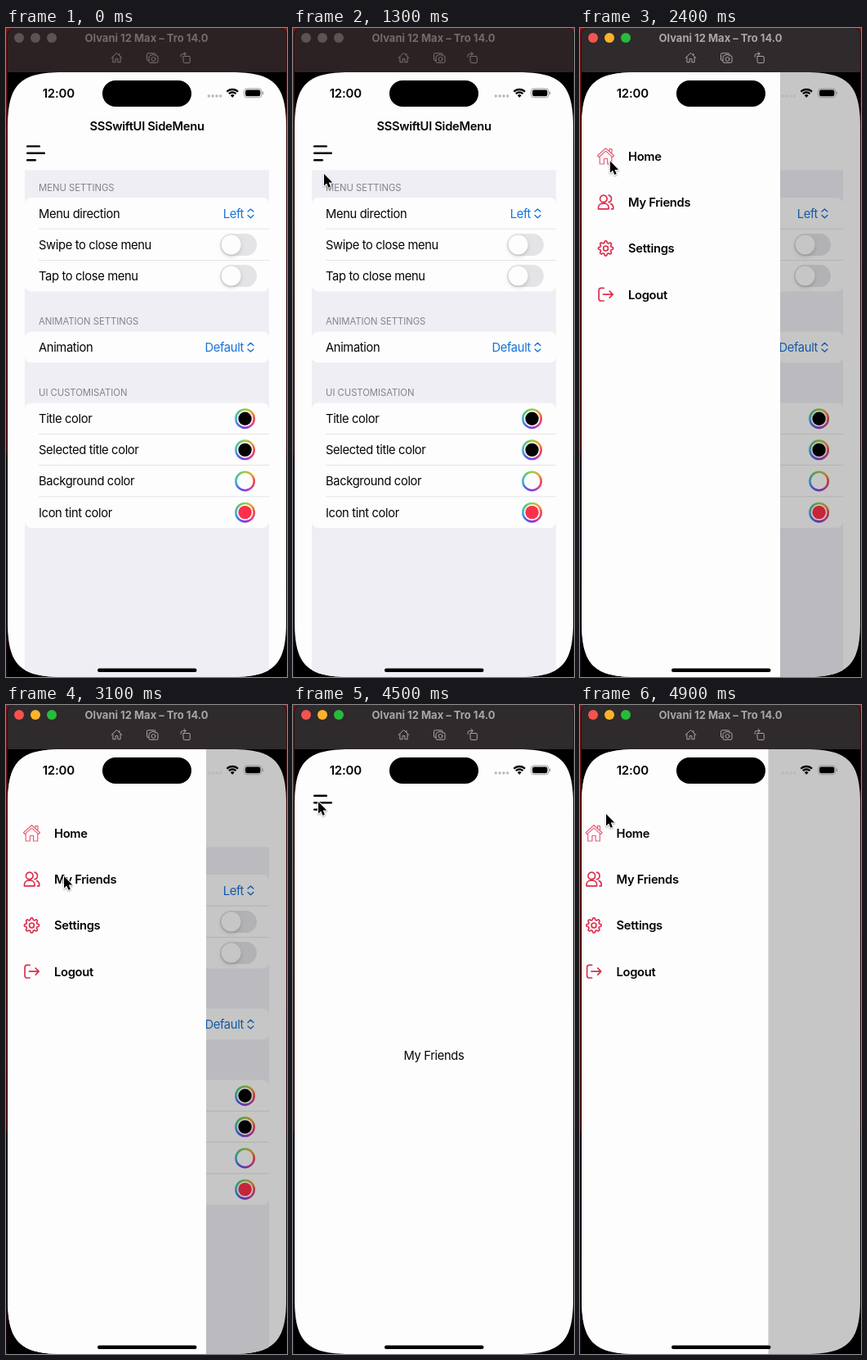
Recreate the animation shown at these times as an HTML page with a canvas. Size 344x792 px, loop 5 s.

```html
<!DOCTYPE html>
<html lang="en">
<head>
<meta charset="utf-8">
<title>Side menu</title>
<style>
html, body { margin: 0; width: 100%; height: 100%; overflow: hidden; background: #000; }
canvas { display: block; width: 344px; height: 792px; }
</style>
</head>
<body>
<canvas id="stage"></canvas>
<script>
const W = 344, H = 792, LOOP = 5000, STEP = 100;
const LEFT = 2, RIGHT = 343, TOP = 54, MENU = 243, SLIDE = 350;
const OPEN_1 = 1855, CLOSE = 3381, OPEN_2 = 4602, ACTIVE = 1800;
const FONT = 'Inter, "Noto Sans", sans-serif';
const WHITE = '#fdfdfd', INK = '#050505', BLUE = '#1873d8', TINT = '#dd2e4f';

const canvas = document.getElementById('stage');
const ctx = canvas.getContext('2d');
const dpr = window.devicePixelRatio || 1;
canvas.width = W * dpr;
canvas.height = H * dpr;

// time, x, y of the pointer tip
const POINTER = [
  [1100, 62, 240], [1300, 38, 178], [1600, 30, 153], [2300, 30, 153],
  [2900, 71, 209], [3300, 71, 209], [3600, 80, 275], [3800, 80, 275],
  [4400, 31, 118], [4600, 31, 118], [4900, 32, 133]
];

const icons = {
  home: new Path2D('M-10-.5L0-9.6 10-.5 8.4 1.3 0-6.2-8.4 1.3ZM4.5-8.6h3v4.6M4.5-8.6v2.6M-7.3 1v8.7h5.2V3.2h4.2v6.5h5.2V1'),
  friends: new Path2D('M1.6-4.2a4.3 4.3 0 1 1-8.6 0a4.3 4.3 0 1 1 8.6 0ZM-9 8.2V6.2a5 5 0 0 1 5-4.6h2.6a5 5 0 0 1 5 4.6v2ZM3.6-8.4a4.3 4.3 0 0 1 0 8.4M6.2 1.9a5 5 0 0 1 3 4.3v2H7'),
  settings: gear(),
  logout: new Path2D('M-2.4-7.8H-6a2.4 2.4 0 0 0-2.4 2.4V5.4A2.4 2.4 0 0 0-6 7.8h3.6M-3 0H8.6M4.7-4L8.7 0 4.7 4'),
  toolHome: new Path2D('M-6.5.3L0-5.8 6.5.3M-4.6-.8V5.5h3.2V1.4h2.8v4.1h3.2V-.8M3.4-5v2'),
  toolShot: new Path2D('M-4.2 3.2H-5a1.5 1.5 0 0 1-1.5-1.5V-4A1.5 1.5 0 0 1-5-5.5H2.5A1.5 1.5 0 0 1 4-4v.5M-4-1.2A1.2 1.2 0 0 1-2.8-2.4h1l1-1.3h3.6l1 1.3h2A1.2 1.2 0 0 1 7-1.2v6a1.2 1.2 0 0 1-1.2 1.2h-8.6A1.2 1.2 0 0 1-4 4.8ZM3.9 1.7a2.4 2.4 0 1 1-4.8 0a2.4 2.4 0 1 1 4.8 0Z'),
  toolTurn: new Path2D('M-2.8-1.8H4A1.3 1.3 0 0 1 5.3-.5V5A1.3 1.3 0 0 1 4 6.3h-5.5A1.3 1.3 0 0 1-2.8 5ZM-6-1v-1.2A2.6 2.6 0 0 1-3.4-4.8H0M-2-7L.2-4.8-2-2.8')
};
const arrow = new Path2D('M0 0V14.4L3.2 11.4 5.5 16.7 7.9 15.7 5.7 10.6H10.3Z');

function gear() {
  const p = new Path2D();
  for (let i = 0; i < 120; i++) {
    const a = i / 120 * 2 * Math.PI;
    const r = 7.9 + 1.2 * Math.tanh(1.8 * Math.cos(8 * a));
    p.lineTo(r * Math.cos(a), r * Math.sin(a));
  }
  p.closePath();
  p.moveTo(2.9, 0);
  p.arc(0, 0, 2.9, 0, 7);
  return p;
}

function rect(x, y, w, h, color, r = 0) {
  ctx.fillStyle = color;
  ctx.beginPath();
  ctx.roundRect(x, y, w, h, r);
  ctx.fill();
}

function disc(x, y, r, color) {
  ctx.fillStyle = color;
  ctx.beginPath();
  ctx.arc(x, y, r, 0, 2 * Math.PI);
  ctx.fill();
}

function text(str, x, y, { size = 14.75, weight = 400, color = INK, align = 'left', gap = -0.37 } = {}) {
  ctx.font = `${weight} ${size}px ${FONT}`;
  ctx.letterSpacing = gap + 'px';
  ctx.textAlign = align;
  ctx.textBaseline = 'alphabetic';
  ctx.fillStyle = color;
  ctx.fillText(str, x, y + size * 0.364);
}

function icon(path, x, y, color, width) {
  ctx.save();
  ctx.translate(x, y);
  ctx.strokeStyle = color;
  ctx.lineWidth = width;
  ctx.lineCap = ctx.lineJoin = 'round';
  ctx.stroke(path);
  ctx.restore();
}

function phoneShape() {
  const e = 67, c = 15, l = LEFT, r = RIGHT, t = TOP, b = H;
  ctx.beginPath();
  ctx.moveTo(l + e, t);
  ctx.lineTo(r - e, t);
  ctx.bezierCurveTo(r - c, t, r, t + c, r, t + e);
  ctx.lineTo(r, b - e);
  ctx.bezierCurveTo(r, b - c, r - c, b, r - e, b);
  ctx.lineTo(l + e, b);
  ctx.bezierCurveTo(l + c, b, l, b - c, l, b - e);
  ctx.lineTo(l, t + e);
  ctx.bezierCurveTo(l, t + c, l + c, t, l + e, t);
  ctx.closePath();
}

function drawWindow(active) {
  const edge = ctx.createLinearGradient(0, 0, 0, H);
  edge.addColorStop(0, '#741416');
  edge.addColorStop(0.655, '#4c0b14');
  edge.addColorStop(0.66, '#1d0b1a');
  edge.addColorStop(1, '#170a16');
  rect(0, 0, W, H, edge);
  rect(1.5, 0, 342, H, '#000', [8, 8, 0, 0]);
  rect(2, 0, 341, TOP, active ? '#2f2a2c' : '#2d2223', [8, 8, 0, 0]);

  const lights = active ? ['#f4544d', '#fcb32b', '#27bb3c'] : Array(3).fill('#5d5354');
  lights.forEach((color, i) => disc(16 + 20 * i, 12, 6, color));
  text('Olvani 12 Max – Tro 14.0', 172, 11.8,
    { size: 13, weight: 700, color: active ? '#aaa6a7' : '#736a6b', align: 'center', gap: 0 });
  const tone = active ? '#a9a5a6' : '#7b7273';
  icon(icons.toolHome, 135.5, 36.3, tone, 1);
  icon(icons.toolShot, 179, 36.3, tone, 1);
  icon(icons.toolTurn, 220, 36.3, tone, 1);
}

function burger(y) {
  [17, 23, 12].forEach((w, i) => rect(25, y + 8.4 * i - 1.2, w, 2.4, INK, 1.2));
}

function toggle(y) {
  rect(262, y - 13.5, 45, 27, '#e4e4e6', 13.5);
  ctx.save();
  ctx.shadowColor = 'rgba(0,0,0,.18)';
  ctx.shadowBlur = 4;
  ctx.shadowOffsetY = 2;
  disc(275.6, y, 12, WHITE);
  ctx.restore();
}

function picker(label, y) {
  text(label, 291, y, { color: BLUE, align: 'right' });
  icon(new Path2D('M-3.4-2.2L0-5.4 3.4-2.2M-3.4 2.2L0 5.4 3.4 2.2'), 299.5, y, BLUE, 1.4);
}

function colorWell(y, color) {
  const x = 292.6;
  const ring = ctx.createConicGradient(0, x, y);
  ['#ee4a4a', '#d6409c', '#8a3ad8', '#4d6ae8', '#46b4dc', '#55c878', '#98d048', '#eea23c', '#ee4a4a']
    .forEach((c, i) => ring.addColorStop(i / 8, c));
  ctx.strokeStyle = ring;
  ctx.lineWidth = 2.6;
  ctx.beginPath();
  ctx.arc(x, y, 11.2, 0, 2 * Math.PI);
  ctx.stroke();
  disc(x, y, 8.2, color);
}

function section(title, y, rows) {
  text(title, 40, y - 12.3, { size: 11.3, color: '#838389', gap: -0.03 });
  rect(23, y, 299, rows.length * 38.15, WHITE, 8);
  rows.forEach(([label, control, value], i) => {
    const mid = y + 19.3 + 38.15 * i;
    text(label, 40, mid, {});
    if (i) rect(40, y + 38.15 * i - 0.4, 282, 0.8, '#dcdce0');
    if (control === picker) picker(value, mid);
    else control(mid, value);
  });
}

function settingsPage() {
  text('SSSwiftUI SideMenu', 172.5, 119.5, { weight: 600, align: 'center', gap: -0.31 });
  burger(144.4);
  rect(23, 173.5, 299, H - 173.5, '#efeef4');
  section('MENU SETTINGS', 207, [
    ['Menu direction', picker, 'Left'],
    ['Swipe to close menu', toggle],
    ['Tap to close menu', toggle]
  ]);
  section('ANIMATION SETTINGS', 370.4, [['Animation', picker, 'Default']]);
  section('UI CUSTOMISATION', 457.4, [
    ['Title color', colorWell, '#000'],
    ['Selected title color', colorWell, '#000'],
    ['Background color', colorWell, WHITE],
    ['Icon tint color', colorWell, '#fc3049']
  ]);
}

function friendsPage() {
  burger(110.8);
  text('My Friends', 172.5, 427.5, { align: 'center' });
}

function drawMenu(shown) {
  const x = LEFT + MENU * (shown - 1);
  rect(x, TOP, MENU, H - TOP, WHITE);
  ['Home', 'My Friends', 'Settings', 'Logout'].forEach((label, i) => {
    const y = 156.3 + 56.3 * i;
    const key = label.split(' ').pop().toLowerCase();
    const first = i === 0;
    icon(icons[key], x + 29.5, y, first ? '#e9607a' : TINT, first ? 1.2 : 1.7);
    text(label, x + 57, y, { weight: 600, gap: -0.31 });
  });
}

function statusBar() {
  text('12:00', 64.3, 79.5, { size: 15, weight: 600, align: 'center', gap: -0.2 });
  rect(118, 64, 109, 32, '#000', 16);
  for (let i = 0; i < 4; i++) disc(248.3 + 4.8 * i, 83, 1.7, '#b9b9bb');

  ctx.strokeStyle = '#000';
  ctx.lineCap = 'butt';
  ctx.lineWidth = 2.3;
  for (const r of [9.6, 6.1]) {
    ctx.beginPath();
    ctx.arc(277.2, 84.6, r, -Math.PI * 0.75, -Math.PI * 0.25);
    ctx.stroke();
  }
  ctx.fillStyle = '#000';
  ctx.beginPath();
  ctx.moveTo(277.2, 85);
  ctx.arc(277.2, 84.6, 3.4, -Math.PI * 0.75, -Math.PI * 0.25);
  ctx.fill();

  ctx.strokeStyle = '#8f8f91';
  ctx.lineWidth = 0.9;
  ctx.beginPath();
  ctx.roundRect(291.5, 74, 21.4, 10.8, 3.4);
  ctx.stroke();
  rect(293, 75.5, 18.4, 7.8, '#000', 2.2);
  rect(313.8, 77.6, 1.3, 3.6, '#8f8f91', [0, 1, 1, 0]);
  rect(112, 781.6, 121.5, 4.4, '#000', 2.2);
}

function drawPointer(t) {
  if (t < POINTER[0][0]) return;
  let [, x, y] = POINTER[POINTER.length - 1];
  const i = POINTER.findIndex(p => p[0] > t);
  if (i > 0) {
    const [t0, x0, y0] = POINTER[i - 1], [t1, x1, y1] = POINTER[i];
    const k = (t - t0) / (t1 - t0);
    x = x0 + (x1 - x0) * k;
    y = y0 + (y1 - y0) * k;
  }
  ctx.save();
  ctx.translate(x, y);
  ctx.lineJoin = 'round';
  ctx.shadowColor = 'rgba(0,0,0,.35)';
  ctx.shadowBlur = 2;
  ctx.shadowOffsetY = 1;
  ctx.strokeStyle = '#fff';
  ctx.lineWidth = 2;
  ctx.stroke(arrow);
  ctx.shadowColor = 'transparent';
  ctx.fillStyle = '#000';
  ctx.fill(arrow);
  ctx.restore();
}

function ease(t, start) {
  const k = Math.min(1, Math.max(0, (t - start) / SLIDE));
  return k * k * (3 - 2 * k);
}

function render(t) {
  const shown = ease(t, OPEN_1) - ease(t, CLOSE) + ease(t, OPEN_2);
  const closing = t >= CLOSE && t < OPEN_2;
  // The shade appears at once on opening and fades with the slide on closing.
  const shade = 0.22 * (closing ? shown : shown > 0 ? 1 : 0);

  ctx.setTransform(dpr, 0, 0, dpr, 0, 0);
  drawWindow(t >= ACTIVE);
  ctx.save();
  phoneShape();
  ctx.clip();
  rect(LEFT, TOP, RIGHT - LEFT, H - TOP, WHITE);
  if (t < CLOSE) settingsPage();
  else friendsPage();
  if (shade > 0) rect(LEFT, TOP, RIGHT - LEFT, H - TOP, `rgba(0,0,0,${shade})`);
  if (shown > 0) drawMenu(shown);
  statusBar();
  ctx.restore();
  drawPointer(t);
}

const begin = performance.now();
function tick() {
  const t = (performance.now() - begin) % LOOP;
  render(Math.floor(t / STEP) * STEP);
  requestAnimationFrame(tick);
}
tick();
</script>
</body>
</html>
```
